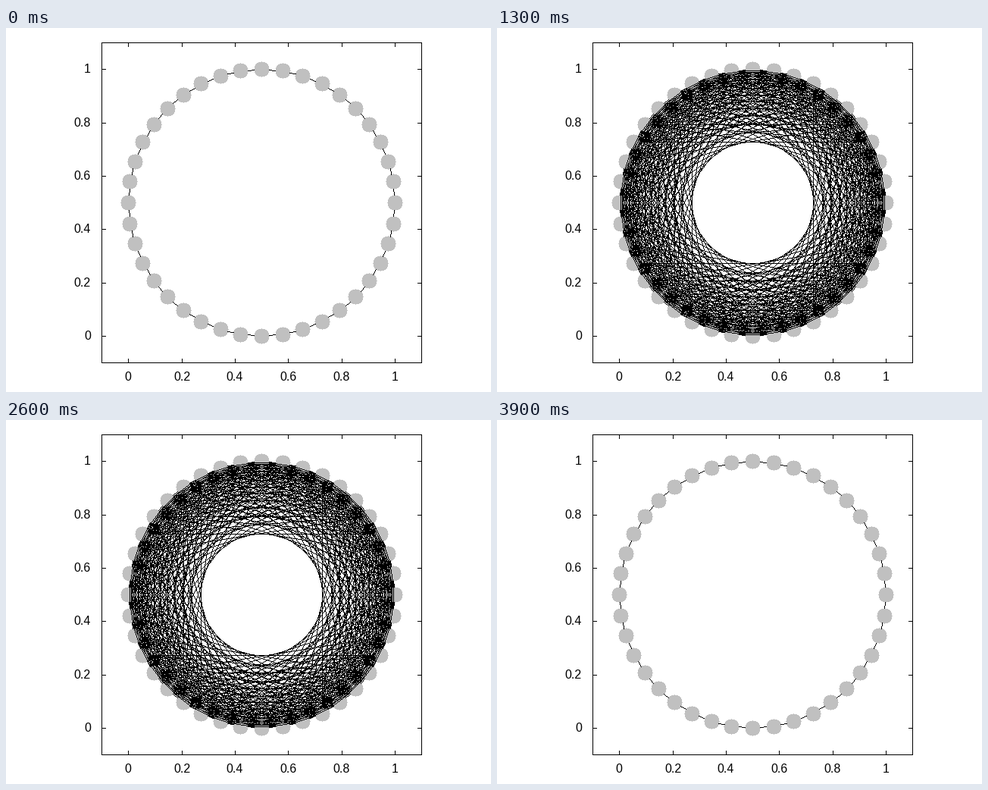
Recreate the animation shown at these times as a matplotlib script. Size 640 by 480 pixels, loop 4000 ms.

```python
import numpy as np
import matplotlib.pyplot as plt
from matplotlib.animation import FuncAnimation

W, H, DPI = 640, 480, 100
LEFT, RIGHT, TOP, BOTTOM = 126, 548, 19, 441
NODES, STEPS = 40, 20
DOT = 10  # node radius; chords stop this far from their own ends
TICK = 5
BLACK, GREY, WHITE = 0, 192, 255


def to_px(x, y):
    """Plot units (-0.1 to 1.1) to pixel positions."""
    return np.array([LEFT + (x + 0.1) / 1.2 * (RIGHT - LEFT),
                     BOTTOM - (y + 0.1) / 1.2 * (BOTTOM - TOP)])


def whole(v):
    return np.floor(np.asarray(v) + 0.5).astype(int)


def line(img, start, end):
    """Black line one pixel wide, without smoothing."""
    (x0, y0), (x1, y1) = whole(start), whole(end)
    t = np.linspace(0, 1, max(abs(x1 - x0), abs(y1 - y0)) + 1)
    img[whole(y0 + (y1 - y0) * t), whole(x0 + (x1 - x0) * t)] = BLACK


def disc(img, centre):
    cx, cy = whole(centre)
    rows, cols = np.ogrid[:H, :W]
    img[(cols - cx) ** 2 + (rows - cy) ** 2 <= DOT ** 2] = GREY


def chord(img, a, b):
    gap = (b - a) / np.hypot(*(b - a)) * DOT
    line(img, a + gap, b - gap)


fig = plt.figure(figsize=(W / DPI, H / DPI), dpi=DPI, facecolor="white")
ax = fig.add_axes([0, 0, 1, 1])
ax.set_axis_off()


def label(x, y, text, align):
    ax.text(x, y, text, ha=align, va="baseline", color="black",
            family="Liberation Sans", fontsize=16 * 72 / DPI)


# Frame, inward ticks on all four sides, and labels
base = np.full((H, W), WHITE, dtype=np.uint8)
corners = [(LEFT, TOP), (RIGHT, TOP), (RIGHT, BOTTOM), (LEFT, BOTTOM)]
for i in range(4):
    line(base, corners[i], corners[(i + 1) % 4])
for value in np.arange(6) / 5:
    x, y = whole(to_px(value, value))
    line(base, (x, BOTTOM), (x, BOTTOM - TICK))
    line(base, (x, TOP), (x, TOP + TICK))
    line(base, (LEFT, y), (LEFT + TICK, y))
    line(base, (RIGHT, y), (RIGHT - TICK, y))
    label(x - 0.5, 464.5, f"{value:g}", "center")
    label(111.5, y + 4.5, f"{value:g}", "right")

# Nodes on the circle
angles = 2 * np.pi * np.arange(NODES) / NODES
nodes = [to_px(0.5 + 0.5 * np.cos(a), 0.5 + 0.5 * np.sin(a)) for a in angles]
for node in nodes:
    disc(base, node)

# Each web adds the chords to neighbours one place further away
webs = []
img = base
for reach in range(1, STEPS + 1):
    img = img.copy()
    for i in range(NODES):
        chord(img, nodes[i], nodes[(i + reach) % NODES])
    webs.append(img)

picture = ax.imshow(webs[0], cmap="gray", vmin=0, vmax=255,
                    interpolation="nearest", aspect="auto")


def draw(frame):
    picture.set_data(webs[min(frame, 2 * STEPS - 1 - frame)])
    return [picture]


anim = FuncAnimation(fig, draw, frames=2 * STEPS, interval=100,
                     repeat=True, repeat_delay=0, blit=False)
plt.show()
```
